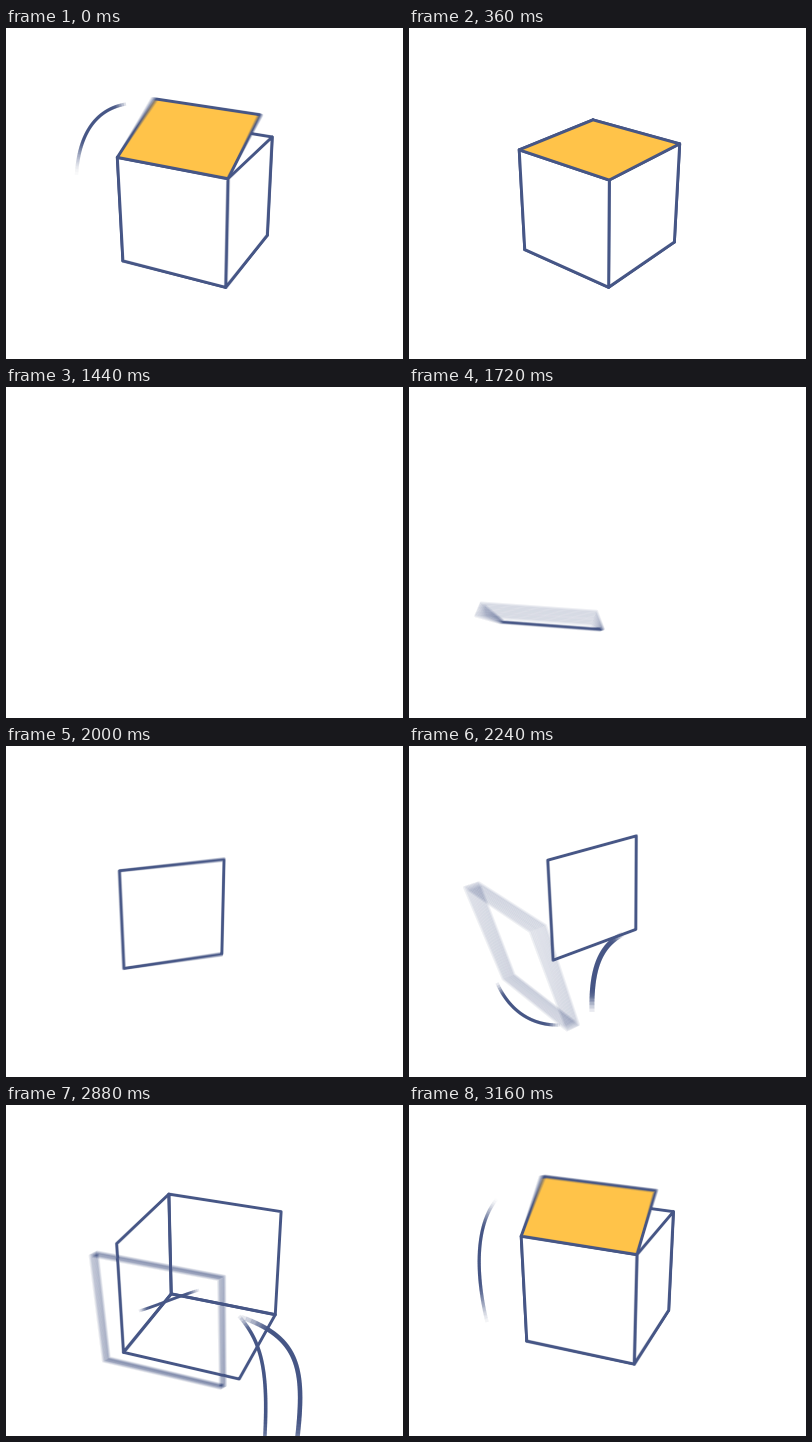
Recreate the animation shown at these times as an HTML page with a canvas. Size 397x331 px, loop 3.2 s.

```html
<!DOCTYPE html>
<html lang="en">
<head>
<meta charset="utf-8">
<title>Box folding</title>
<style>
html, body { margin: 0; width: 100%; height: 100%; overflow: hidden; background: #fff; }
canvas { display: block; }
</style>
</head>
<body>
<canvas id="stage" width="397" height="331"></canvas>
<script>
const W = 397, H = 331, LOOP = 3200, STEP = 40, SHUTTER = 18, SAMPLES = 12;
const INK = '#465686', LID = '#ffc349', DEPTH = 0.16, RAD = Math.PI / 180;
const stage = document.getElementById('stage').getContext('2d');
const layer = document.createElement('canvas');
layer.width = W;
layer.height = H;
const g = layer.getContext('2d');
g.lineJoin = 'round';

const clamp = x => Math.max(0, Math.min(1, x));

// Time, yaw, pitch, size, centre x, centre y
const views = [
  [1720, 9, 26, 112, 147, 211],
  [2240, -39, 26, 112, 219.5, 169.5],
  [2640, 3, 25.5, 105.6, 205.5, 173],
  [2880, 21, 30, 122, 196.3, 177],
  [3160, 21.5, 26, 113, 191.5, 171],
  [3200, 25.5, 26, 112, 191.5, 171],
  [3600, 39.5, 26, 110, 191.3, 170]
];

// Smooth curve through the views, at rest at both ends
function viewAt(t) {
  const last = views.length - 1;
  t = Math.max(views[0][0], Math.min(views[last][0], t));
  const i = Math.min(last - 1, views.findLastIndex(v => v[0] <= t));
  const a = views[i], b = views[i + 1], span = b[0] - a[0], s = (t - a[0]) / span;
  const slope = (j, c) => j === 0 || j === last ? 0
    : (views[j + 1][c] - views[j - 1][c]) / (views[j + 1][0] - views[j - 1][0]) * span;
  return a.map((v, c) => {
    const rise = s * s * (3 - 2 * s);
    return v + (b[c] - v) * rise + s * (1 - s) * ((1 - s) * slope(i, c) - s * slope(i + 1, c));
  });
}

function project([x, y, z], [, yaw, pitch, size, cx, cy]) {
  const sy = Math.sin(yaw * RAD), sp = Math.sin(pitch * RAD);
  const co = Math.cos(yaw * RAD), cp = Math.cos(pitch * RAD);
  const side = x * co - z * sy, depth = x * sy + z * co;
  const k = size / (1 - DEPTH * (y * sp + depth * cp));
  return [cx + side * k, cy - (y * cp - depth * sp) * k];
}

// Unit cube: A-D run clockwise round the back wall, E-H round the front
function corner(name) {
  const i = 'ABCDEFGH'.indexOf(name), n = i % 4;
  return [n === 1 || n === 2 ? 0.5 : -0.5, n < 2 ? 0.5 : -0.5, i > 3 ? 0.5 : -0.5];
}

// Each side flies in by "from" and swings by "fold" degrees about its first two corners
const sides = [
  { at: 'DCBA', start: 1440, land: 1880, from: [-2.6, -1.2, 0], fold: -154 },
  { at: 'DCGH', start: 2300, land: 2580, from: [0, -3, 0], fold: 40 },
  { at: 'DHEA', start: 2040, land: 2475, from: [-3, 0, 0], fold: 28 },
  { at: 'CGFB', start: 2860, land: 3080, from: [1, -3.5, 0], fold: 60, wall: true },
  { at: 'HGFE', start: 2680, land: 3000, from: [-1.6, 0, 2.6], fold: 10, wall: true },
  { at: 'EFBA', start: 2940, land: 3120, shut: 3320, from: [-3, 0, 0], fold: 152, lift: 0.42, fill: LID }
];

function sideCorners({ at, start, land, shut = land, from, fold, lift = 1 }, t) {
  const c = [...at].map(corner);
  const left = end => clamp((end - t) / (end - start));
  const slide = left(land) ** 3, angle = fold * left(shut) * RAD;
  return c.map((p, i) => p.map((v, k) => {
    const normal = c.reduce((sum, q) => sum + q[k], 0) / 2;
    const edge = c[3][k] - c[0][k];
    const swing = i < 2 ? 0 : edge * (Math.cos(angle) - 1) + normal * lift * Math.sin(angle);
    return v + swing + from[k] * slide;
  }));
}

function drawSide(side, t, view) {
  if (t < side.start) return;
  g.beginPath();
  sideCorners(side, t).forEach(p => g.lineTo(...project(p, view)));
  g.closePath();
  const fill = side.fill || side.wall && t > 3060 && '#fff';
  if (fill) {
    g.fillStyle = fill;
    g.fill();
  }
  g.strokeStyle = INK;
  g.lineWidth = 2.9;
  g.stroke();
}

// Swooshes: start, tail delay, width and a Bezier curve
const trails = [
  [2140, 100, 3.2, 88, 237, 100, 264, 122, 280, 151, 279],
  [2140, 100, 5, 183, 266, 182, 225, 190, 200, 214, 188],
  [2540, 100, 5, -10, 172, 28, 205, 52, 245, 57, 281],
  [2540, 100, 4, 122, 223, 123, 226, 125, 229, 126, 232],
  [2780, 100, 3.5, 257, 360, 264, 270, 258, 240, 233, 211],
  [2780, 100, 4.5, 288, 360, 300, 270, 300, 235, 235, 212],
  [2780, 100, 2.8, 133, 206, 150, 201, 170, 192, 193, 185],
  [3095, 60, 3.2, 78, 217, 62, 150, 68, 85, 120, 76]
];

function drawTrail([start, delay, width, ...p], t) {
  const head = clamp((t - start) / 100), tail = clamp((t - start - delay) / 100);
  if (head <= tail) return;
  const n = 32;
  const at = k => {
    const s = tail + (head - tail) * Math.min(k, n) / n, r = 1 - s;
    return [0, 1].map(c => r ** 3 * p[c] + 3 * r * r * s * p[c + 2] + 3 * r * s * s * p[c + 4] + s ** 3 * p[c + 6]);
  };
  g.strokeStyle = INK;
  g.lineWidth = width;
  for (let k = 0; k < n; k++) {
    g.globalAlpha = Math.min(1, (k + 1) / 5, (n - k) / 5);
    g.beginPath();
    g.moveTo(...at(k));
    g.lineTo(...at(k + 1.15));
    g.stroke();
  }
  g.globalAlpha = 1;
}

function drawScene(t) {
  const view = viewAt(t);
  g.globalAlpha = 1;
  g.fillStyle = '#fff';
  g.fillRect(0, 0, W, H);
  trails.forEach(trail => drawTrail(trail, t));
  sides.forEach(side => drawSide(side, t, view));
  // Final fade to an empty page
  g.globalAlpha = clamp((t - 4000) / 240);
  g.fillStyle = '#fff';
  g.fillRect(0, 0, W, H);
}

const begin = performance.now();
function tick() {
  let t = Math.floor((performance.now() - begin) % LOOP / STEP) * STEP;
  if (t < 1200) t += LOOP;
  // Average several moments for motion blur
  for (let i = 0; i < SAMPLES; i++) {
    drawScene(t + ((i + 0.5) / SAMPLES - 0.5) * SHUTTER);
    stage.globalAlpha = 1 / (i + 1);
    stage.drawImage(layer, 0, 0);
  }
  requestAnimationFrame(tick);
}
tick();
</script>
</body>
</html>
```
